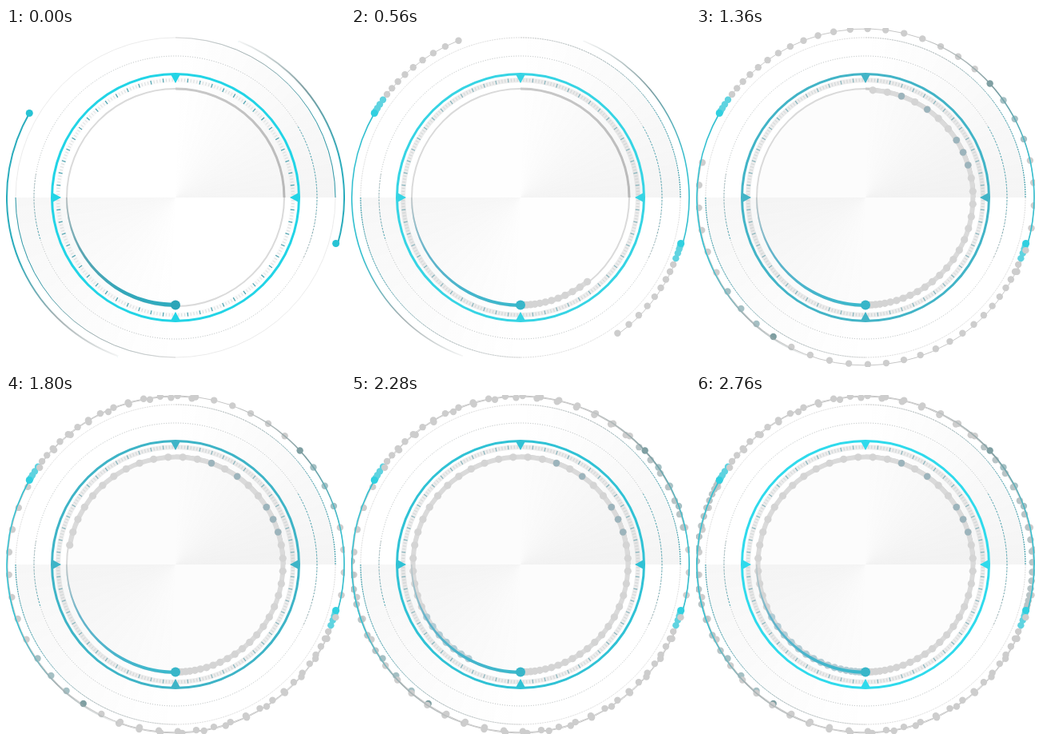
These frames come from a looping animation (424 px wide and 424 px high, 2.8 s). An HTML page with a canvas:

```html
<!DOCTYPE html>
<html>
<head>
<meta charset="utf-8">
<style>
html, body { margin: 0; width: 100%; height: 100%; overflow: hidden; background: #fff; }
canvas { display: block; }
</style>
</head>
<body>
<canvas id="dial" width="424" height="424"></canvas>
<script>
const ctx = document.getElementById('dial').getContext('2d');
const C = 212, TAU = Math.PI * 2, LOOP = 2800, STEP = 40, LAST = 69;
const rad = deg => deg * Math.PI / 180;
const turn = n => { const p = n / LAST; return 360 * p * p * (3 - 2 * p); };

// Ring colour over time: [ms, r, g, b]
const ringTones = [
  [0, 34, 212, 230], [560, 54, 212, 228], [1000, 30, 158, 178], [1360, 66, 180, 199],
  [1800, 62, 180, 199], [2280, 48, 194, 213], [2760, 47, 218, 236]
];
const boldInner = [25, 26, 27, 30, 32];

function ringColor(t) {
  const i = Math.max(1, ringTones.findIndex(k => k[0] >= t));
  const a = ringTones[i - 1], b = ringTones[i];
  const f = (t - a[0]) / (b[0] - a[0]);
  return `rgb(${[1, 2, 3].map(j => Math.round(a[j] + (b[j] - a[j]) * f))})`;
}

function arc(r, from, to, width, style) {
  ctx.beginPath();
  ctx.arc(C, C, r, rad(from), rad(to));
  ctx.lineWidth = width;
  ctx.strokeStyle = style;
  ctx.stroke();
}

// Conic gradient whose colours spread evenly over [from, from + span]
function sweep(from, span, ...colors) {
  const g = ctx.createConicGradient(rad(from), C, C);
  colors.forEach((c, i) => g.addColorStop(span / 360 * i / (colors.length - 1), c));
  return g;
}

function dot(r, deg, size, color) {
  ctx.beginPath();
  ctx.arc(C + r * Math.cos(rad(deg)), C + r * Math.sin(rad(deg)), size, 0, TAU);
  ctx.fillStyle = color;
  ctx.fill();
}

function wedge(from, alpha) {
  ctx.beginPath();
  ctx.moveTo(C, C);
  ctx.arc(C, C, 200, rad(from), rad(from + 90));
  ctx.fillStyle = sweep(from, 90, 'rgba(110,110,110,0)', `rgba(110,110,110,${alpha})`);
  ctx.fill();
}

function ticks(every, r0, r1, width, color) {
  ctx.beginPath();
  for (let d = 0; d < 360; d += every) {
    const x = Math.cos(rad(d)), y = Math.sin(rad(d));
    ctx.moveTo(C + r0 * x, C + r0 * y);
    ctx.lineTo(C + r1 * x, C + r1 * y);
  }
  ctx.lineWidth = width;
  ctx.strokeStyle = color;
  ctx.stroke();
}

function pointers(color) {
  ctx.fillStyle = color;
  for (let i = 0; i < 4; i++) {
    ctx.save();
    ctx.translate(C, C);
    ctx.rotate(i * TAU / 4);
    ctx.beginPath();
    ctx.moveTo(-6, -154);
    ctx.lineTo(6, -154);
    ctx.lineTo(0, -143);
    ctx.fill();
    ctx.restore();
  }
}

function stampColor(n) {
  if (n < 6) return '#5fd3e0';
  if (n === 25) return '#7f9fa2';
  if (n > 25 && n < 29) return '#a5c0c4';
  return n > 50 ? '#b8c4c6' : '#cdcdcd';
}

function drawBase(n) {
  const spread = Math.min(1, n / 12);
  wedge(-90, 0.07);
  wedge(90, 0.055);
  dot(0, 0, 136, `rgba(110,110,110,${0.018 * Math.min(1, n / 34)})`);

  if (n) ctx.setLineDash([2, 1]);
  arc(200, 0, 360, 0.8, n ? '#d4d4d4' : '#e6e6e6');
  arc(200, -90, 0, 1, sweep(-90, 90, '#d8d8d8', '#9fb0b2', '#2f9aa9', '#2f9aa9'));
  arc(200, 90, 180, 1, sweep(90, 90, '#d8d8d8', '#9fb0b2', '#2f9aa9', '#2f9aa9'));
  ctx.setLineDash([1, 2]);
  arc(177, 0, 360, 1, '#aeb4b5');
  ctx.setLineDash([2, 2]);
  arc(177, -30, 25, 1, sweep(-30, 55, '#3a9dac', '#3a9dac', '#a5b4b6'));
  arc(177, 163, 190, 1, sweep(163, 27, '#3a9dac', '#a5b4b6'));
  ctx.setLineDash([]);

  arc(136, 0, 360, 2, '#dadada');
  arc(136, -90, 0, 3, sweep(-90, 90, '#cacaca', '#b8b8b8'));

  arc(147, 0, 360, 6, `rgba(150,150,150,${0.05 + 0.13 * spread})`);
  ticks(1.5, 145, 149, 0.7, n ? '#c4cbcc' : '#ccd2d3');
  ticks(6, 144.5, 149.5, 1.2, n ? '#86b4bd' : '#4aa3b1');
}

function drawTrails(n) {
  const head = turn(n);
  if (n) {
    arc(211, 210, 210 + head, 1, '#c6c6c6');
    arc(210, 16, 16 + head, 1, '#c6c6c6');
    arc(134.5, 90 - head, 90, 6, '#dadada');
  }
  for (let k = 1; k <= n; k++) {
    const a = turn(k), color = stampColor(k);
    dot(211, 210 + a, 4.2, color);
    dot(208.7, 16 + a, 4.2, color);
    dot(134.5, 90 - a, 4.6, k > 50 ? '#b4ccd4' : '#d4d4d4');
  }
  for (const k of boldInner) if (k <= n) dot(134.5, 90 - turn(k), 4.2, '#9cb4bc');
}

function drawHeads(n) {
  const line = n ? '#35c0d0' : '#2bacbc';
  const knob = n ? '#30d0e0' : '#27c3d4';
  arc(211, 110, 210, n ? 1.6 : 2, sweep(110, 100, 'rgba(150,160,160,.1)', '#a3b0b2', line, line, line));
  arc(211, -68, 16, n ? 1.6 : 2, sweep(-68, 84, 'rgba(150,160,160,.1)', '#7f9fa3', line, line));
  dot(211, 210, 4.5, knob);
  dot(208.7, 16, 4.5, knob);

  // Tapered inner arc: outer edge fixed, inner edge closing in toward its tail
  ctx.beginPath();
  ctx.arc(C, C, 137, rad(90), rad(180));
  for (let d = 180; d >= 90; d -= 3) {
    const r = 135.5 - (n ? 3 : 4) * (180 - d) / 90;
    ctx.lineTo(C + r * Math.cos(rad(d)), C + r * Math.sin(rad(d)));
  }
  ctx.fillStyle = n
    ? sweep(90, 90, '#3ab9cc', '#46b5cc', '#62b4cb', '#c2c8ca')
    : sweep(90, 90, '#2fadc0', '#34a6b9', '#5aa5b2', '#b5bcbe');
  ctx.fill();
  dot(134.5, 90, 6, n ? '#38b6c9' : '#2da5b8');
}

function frame(now) {
  const n = Math.floor(now % LOOP / STEP);
  const color = ringColor(n * STEP);
  ctx.clearRect(0, 0, 424, 424);
  drawBase(n);
  drawTrails(n);
  drawHeads(n);
  arc(154.5, 0, 360, 3, color);
  pointers(color);
  requestAnimationFrame(frame);
}
requestAnimationFrame(frame);
</script>
</body>
</html>
```
